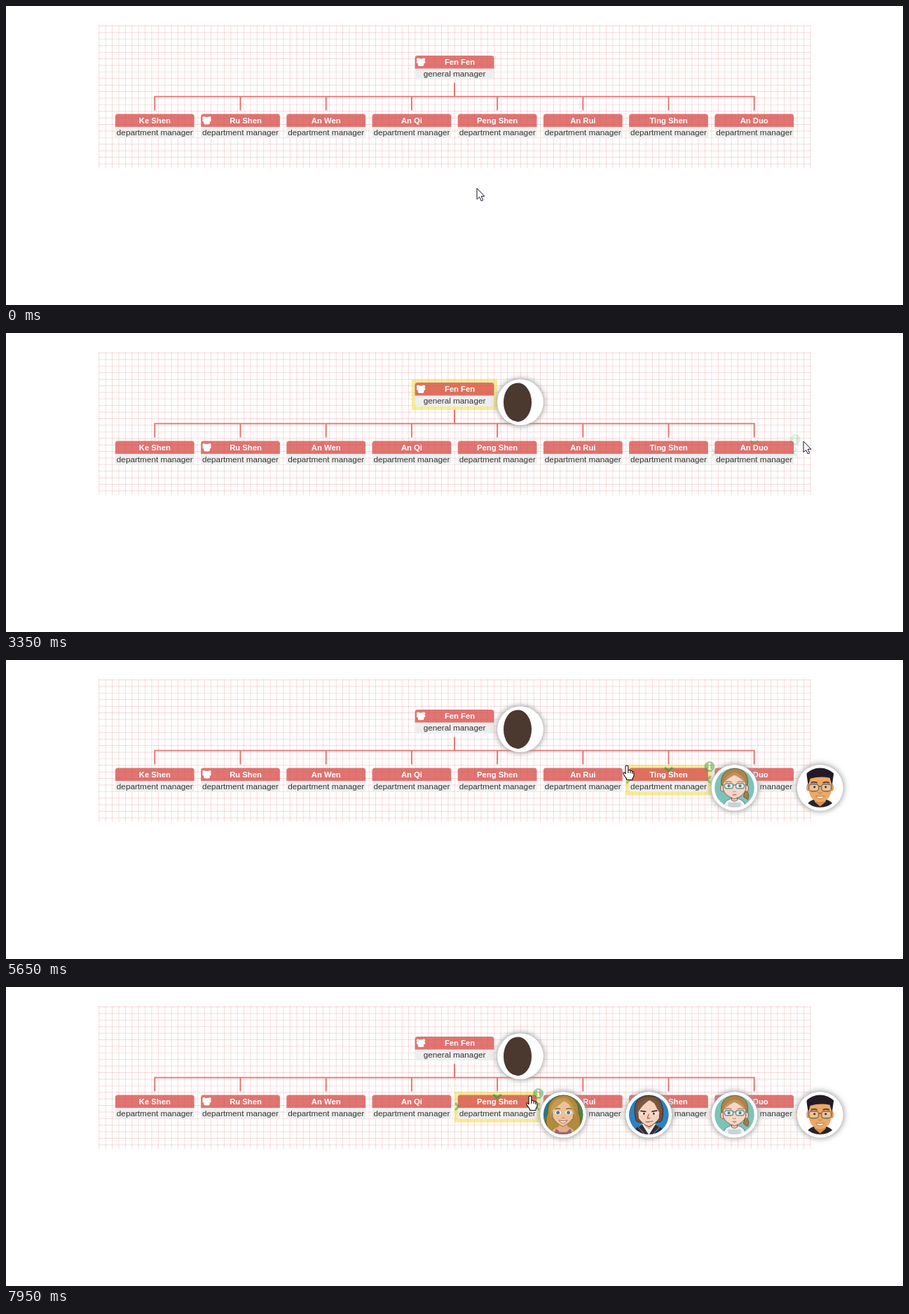
These frames come from a looping animation (1280x428 px, 8000 ms). An HTML page:

```html
<!DOCTYPE html>
<html lang="en">
<head>
<meta charset="utf-8">
<title>Organisation chart</title>
<style>
  html, body { margin: 0; width: 100%; height: 100%; overflow: hidden; background: #fff; }
  svg { display: block; width: 1280px; height: 428px; }
  text { font-family: "Liberation Sans", Arial, sans-serif; text-anchor: middle; }
  .name { font-size: 11.28px; font-weight: bold; fill: #fff; }
  .role { font-size: 11.74px; fill: #333; }
  .chevron { fill: none; stroke: #449d44; stroke-width: 3; }
  .shadow { fill: #999; filter: blur(4.2px); }
</style>
</head>
<body>
<svg id="stage" viewBox="0 0 1280 428">
  <defs>
    <clipPath id="round"><circle r="28.3"/></clipPath>

    <g id="plain"><ellipse cx="-4" rx="20" ry="28" fill="#4b382f"/></g>

    <g id="glasses-man">
      <path d="M-20 29Q-19 20-9 17H9Q19 20 20 29Z" fill="#25252a"/>
      <path d="M-8 14H8V20L0 27L-8 20Z" fill="#d88d4a"/>
      <ellipse cx="-17" cy="0" rx="2.4" ry="5" fill="#e09a55"/>
      <ellipse cx="17" cy="0" rx="2.4" ry="5" fill="#e09a55"/>
      <path d="M-16-16H16V4Q15 14 7 19Q0 22-7 19Q-15 14-16 4Z" fill="#efa763"/>
      <path d="M-17-3L-19-17Q-20-24-12-27Q0-32 12-28L20-24L17-3L14-14Q0-17-14-13Z" fill="#241a26"/>
      <path d="M-13-7Q-9-9-4-7M4-7Q9-9 13-7" fill="none" stroke="#3d2a28" stroke-width="1.6"/>
      <g fill="#f0c08c" stroke="#6d6a6a" stroke-width="1.4">
        <rect x="-16" y="-5" width="14" height="10" rx="4"/>
        <rect x="2" y="-5" width="14" height="10" rx="4"/>
        <path d="M-2-2H2"/>
      </g>
      <circle cx="-8" cy="-1" r="1.5" fill="#3c2c2a"/><circle cx="8" cy="-1" r="1.5" fill="#3c2c2a"/>
      <path d="M-3 7Q0 9 3 7" fill="none" stroke="#c47f43" stroke-width="1.2"/>
      <path d="M-6 12Q0 13 6 12Q4 16 0 16Q-4 16-6 12Z" fill="#fff" stroke="#a35c33" stroke-width=".8"/>
    </g>

    <g id="glasses-girl">
      <rect x="-29" y="-29" width="58" height="58" fill="#7cc3ba"/>
      <path d="M15 2Q23 8 19 17L13 13Z" fill="#a97b43" stroke="#6e4d2c" stroke-width=".8"/>
      <path d="M-16 29Q-16 19-6 16H6Q16 19 16 29Z" fill="#eef1f3" stroke="#6e777c"/>
      <path d="M-9 29V21H9V29" fill="#c9d2d8"/>
      <path d="M-18 1Q-22-17-11-24Q1-31 12-24Q22-17 18 1Z" fill="#b0834a" stroke="#6e4d2c" stroke-width=".8"/>
      <g fill="#f0c9b6" stroke="#6e4d42" stroke-width=".8">
        <ellipse cx="-17" cy="1" rx="3" ry="4.5"/><ellipse cx="17" cy="1" rx="3" ry="4.5"/>
        <path d="M-4 12H4V18Q0 21-4 18Z"/>
      </g>
      <path d="M-16-8Q-9-19 0-19Q10-19 16-8V3Q13 12 0 16Q-13 12-16 3Z" fill="#f6d6c5" stroke="#6e4d42" stroke-width=".8"/>
      <path d="M-17-4Q-14-18 0-22Q14-18 17-4Q11-13 0-18Q-11-13-17-4Z" fill="#c0935a"/>
      <path d="M-13-8Q-8-10-4-8M4-8Q8-10 13-8" fill="none" stroke="#80603f"/>
      <g fill="#e5efee" stroke="#5f7f7c" stroke-width="1.2">
        <rect x="-14" y="-6" width="12" height="7" rx="2.5"/>
        <rect x="2" y="-6" width="12" height="7" rx="2.5"/>
        <path d="M-2-4H2"/>
      </g>
      <circle cx="-8" cy="-2.5" r="2" fill="#4f7f7f"/><circle cx="8" cy="-2.5" r="2" fill="#4f7f7f"/>
      <path d="M-2 5Q0 7 2 5" fill="none" stroke="#b97e6b"/>
      <path d="M-3.5 10Q0 8 3.5 10Q0 12.5-3.5 10" fill="#d77d7b"/>
    </g>

    <g id="suit-man">
      <rect x="-29" y="-29" width="58" height="58" fill="#2b82c6"/>
      <path d="M-24 29Q-21 18-9 14H9Q21 18 24 29Z" fill="#2f3036"/>
      <path d="M-10 13L0 29L10 13Z" fill="#f2f2f2"/>
      <path d="M-10 13L-15 18L-5 29M10 13L15 18L5 29" fill="none" stroke="#8d9097"/>
      <path d="M-18 9Q-23-10-17-20Q-9-29 3-27Q18-26 20-9Q21 3 18 9L14 11H-14Z" fill="#74503a" stroke="#33231b" stroke-width=".9"/>
      <path d="M-6 10H6V16L0 21L-6 16Z" fill="#dcae95"/>
      <path d="M-16-9Q-9-22 1-21Q12-20 16-8L15 5Q9 14 0 17Q-9 14-15 5Z" fill="#f5d2bf" stroke="#4c352b" stroke-width=".9"/>
      <path d="M-17 0Q-18-17-5-23H5Q17-18 17 0Q12-7 8-16L1-21Q-9-14-13-7Z" fill="#7d5940"/>
      <path d="M-12-5.5L-4-4.5M4-4.5L12-6" stroke="#4c3125" stroke-width="1.8"/>
      <path d="M-11-1.5H-4M4-1.5H11" stroke="#fff" stroke-width="2.6"/>
      <circle cx="-7" cy="-1.5" r="1.5" fill="#403b3b"/><circle cx="7" cy="-1.5" r="1.5" fill="#403b3b"/>
      <path d="M0-1L-2 5H2M-5 10Q1 11 6 9" fill="none" stroke="#9a6555" stroke-width="1.2"/>
    </g>

    <g id="blonde-girl">
      <rect x="-29" y="-29" width="58" height="58" fill="#2a7686"/>
      <path d="M8-29H29V29H-29V5L-17 0Z" fill="#4e8440"/>
      <path d="M-20 24Q-28 10-22-2Q-23-17-12-24Q0-31 12-25Q23-17 22-2Q28 10 21 24L13 27H-13Z" fill="#b08a3e" stroke="#6e5427" stroke-width=".9"/>
      <path d="M-18 29Q-16 20-6 17V11H6V17Q16 20 18 29Z" fill="#dfae84"/>
      <path d="M-14 29L-10 20L-5 25H5L10 20L14 29Z" fill="#a0607a"/>
      <path d="M-16-8Q-9-20 1-20Q12-19 16-7L14 5Q9 13 0 17Q-10 13-15 4Z" fill="#ecc199" stroke="#80593c" stroke-width=".8"/>
      <path d="M-18 4Q-21-13-9-22L2-24Q16-19 18 4Q13-6 8-15L1-20Q-7-12-14-8Z" fill="#c29b4c"/>
      <path d="M-12-8Q-8-10-4-8M4-8Q8-10 12-8" fill="none" stroke="#79552f" stroke-width="1.2"/>
      <ellipse cx="-7.5" cy="-3" rx="4.2" ry="2.8" fill="#fff"/><ellipse cx="7.5" cy="-3" rx="4.2" ry="2.8" fill="#fff"/>
      <circle cx="-7.5" cy="-3" r="2.5" fill="#3b7fa8"/><circle cx="7.5" cy="-3" r="2.5" fill="#3b7fa8"/>
      <path d="M-2 4Q0 6 2 4" fill="none" stroke="#a97450"/>
      <path d="M-6 8Q0 10 6 8Q4 12 0 12Q-4 12-6 8Z" fill="#fff" stroke="#a8584f" stroke-width=".9"/>
    </g>

    <g id="team" fill="#fff">
      <circle cx="-4" cy="-3.4" r="2.2"/><circle cx="4" cy="-3.4" r="2.2"/>
      <rect x="-6.2" y="-1.8" width="12.4" height="3.8" rx="1.6"/>
      <circle cy="-1.8" r="3"/><rect x="-4.4" y="1" width="8.8" height="5" rx="2"/>
    </g>
  </defs>
  <g id="grid" fill="rgba(200,0,0,.15)"></g>
  <path id="links" fill="none" stroke="rgba(217,83,79,.8)" stroke-width="1.9"/>
  <g id="nodes"></g>
  <g id="photos"></g>
  <g id="cursor" stroke-linejoin="round">
    <path id="arrow" d="M0 0V15.6L3.6 12.3L6.2 18L8.7 16.9L6.2 11.3H10.8Z" fill="#fff" stroke="#15152e" stroke-width="1"/>
    <path id="hand" d="M-2 1.6Q-2 0 0 0Q1.8 0 1.8 1.6V6.8Q4.4 5.8 5 7.7Q7.2 6.9 7.8 8.8Q10 8.4 10 10.8V14Q9.7 17 8 18.5V20.5H-.5V18.8Q-3.6 15-5.3 11.8Q-5.5 9.3-3.3 10.2L-2 11.8ZM1.8 7V11M5 8V11M7.8 9V12" fill="#fff" stroke="#111" stroke-width="1.1"/>
  </g>
</svg>
<script>
const LOOP = 8000, TICK = 50;
const STEP = 122.2, FIRST = 212.3, ROW = 149.8, MID = 640;
const $ = id => document.getElementById(id);

// hover: pointer inside the card; focus: from one info click to the next; over: pointer on the info icon
const staff = [
  { name: "Fen Fen", role: "general manager", x: MID, y: 66.2, team: true, photo: "plain",
    hover: [[1450, 2250]], focus: [1900, 4150], over: [[1500, 2250]] },
  { name: "Ke Shen" },
  { name: "Ru Shen", team: true },
  { name: "An Wen" },
  { name: "An Qi" },
  { name: "Peng Shen", photo: "blonde-girl", hover: [[7350, LOOP]], focus: [7550, LOOP], over: [[7450, 7650]] },
  { name: "An Rui", photo: "suit-man", hover: [[5850, 7350]], focus: [6000, 7550], over: [[5900, 6100]] },
  { name: "Ting Shen", photo: "glasses-girl", hover: [[4900, 5850]], focus: [5250, 6000], over: [[5000, 5350]] },
  { name: "An Duo", photo: "glasses-man", hover: [[2950, 3150], [3650, 4900]], focus: [4150, 5250], over: [[3800, 4250]] },
];

// time, x, y of the pointer tip
const path = [
  [700, 672, 261], [1000, 735, 180], [1250, 750, 100], [1400, 714, 74], [1500, 697, 70],
  [2200, 697, 70], [2600, 910, 118], [3000, 1121, 157], [3200, 1135, 156], [3350, 1138, 155],
  [3550, 1138, 155], [3850, 1127, 153], [4150, 1127, 153], [4650, 1011, 151], [4750, 1011, 151],
  [4950, 1004, 152], [5250, 1004, 152], [5600, 886, 151], [5800, 886, 151], [5900, 881, 152],
  [6100, 881, 152], [6600, 816, 154], [6750, 816, 154], [7400, 761, 153], [7650, 759, 153], [7900, 748, 156],
];

const within = (t, spans = []) => spans.some(([a, b]) => t >= a && t < b);

function fade(t, spans) {
  return Math.max(0, ...spans.map(([a, b]) =>
    t < a ? 0 : t < b ? Math.min(1, (t - a + TICK) / 200) : 1 - (t - b) / 300));
}

function pointer(t) {
  if (t <= path[0][0]) return path[0].slice(1);
  const i = path.findIndex(p => p[0] > t);
  if (i < 0) return path[path.length - 1].slice(1);
  const [t0, x0, y0] = path[i - 1], [t1, x1, y1] = path[i];
  const k = (t - t0) / (t1 - t0), s = k * k * (3 - 2 * k);
  return [x0 + (x1 - x0) * s, y0 + (y1 - y0) * s];
}

function add(parent, markup, x, y) {
  const g = document.createElementNS("http://www.w3.org/2000/svg", "g");
  g.setAttribute("transform", `translate(${x} ${y})`);
  g.innerHTML = markup;
  return parent.appendChild(g);
}

function drawGrid() {
  const gap = 9.4, w = 0.94;
  let down = "", across = "";
  for (let x = 132.3; x < 1148.5; x += gap) down += `M${x} 27.5v204.5h${w}v-204.5z`;
  for (let y = 28.1; y < 232; y += gap) across += `M131.6 ${y}h1017v${w}h-1017z`;
  $("grid").innerHTML = `<path d="${down}"/><path d="${across}"/>`;
}

function drawLinks() {
  let d = `M${MID} 110V128.7M${FIRST - 0.95} 129.6H${FIRST + 7 * STEP + 0.95}`;
  for (let i = 0; i < 8; i++) d += `M${FIRST + i * STEP} 130.5V149.5`;
  $("links").setAttribute("d", d);
}

const rootEdges = '<path class="chevron" opacity=".5" d="M-5.8 44L0 38.7L5.8 44"/>';
const rowEdges = `<path class="chevron" opacity=".85" d="M-5.5 4.2L0 9.4L5.5 4.2"/>
  <path class="chevron" opacity=".55" d="M-60 16.5L-55.5 21.5L-60 26.5M60 16.5L55.5 21.5L60 26.5"/>`;

function drawCard(p, i) {
  const x = p.x ?? FIRST + (i - 1) * STEP, y = p.y ?? ROW;
  const g = add($("nodes"), `
    <rect class="glow" x="-61.1" width="122.2" height="44" fill="rgba(238,217,54,.5)"/>
    <path d="M-56.4 23.5v-15q0-3.8 3.8-3.8h105.2q3.8 0 3.8 3.8v15z" fill="rgba(217,83,79,.8)"/>
    <path d="M-56.4 23.5h112.8v13q0 2.5-2.5 2.5h-107.8q-2.5 0-2.5-2.5z" fill="#eee"/>
    ${p.team ? '<use href="#team" x="-48" y="13.8"/>' : ""}
    <text class="name" x="${p.team ? 7.5 : 0}" y="18">${p.name}</text>
    <text class="role" y="35">${p.role ?? "department manager"}</text>
    <g class="tools">${i ? rowEdges : rootEdges}
      <g class="info" transform="translate(58.5 2.8)">
        <circle r="7.5" fill="#449d44"/>
        <path d="M-1.3-5h2.6v2.3h-2.6zM-2.2-1.4h3.5v4.2h1v1.6h-4.6v-1.6h1v-2.6h-.9z" fill="#fff"/>
      </g>
    </g>`, x, y);
  for (const part of ["glow", "tools", "info"]) p[part] = g.querySelector("." + part);
  if (p.photo) p.face = add($("photos"), `<circle class="shadow" r="33.8"/><circle r="32.9" fill="#fff"/>
    <g clip-path="url(#round)"><use href="#${p.photo}"/></g>`, x + 94, y + 33);
}

const show = (el, on) => el.setAttribute("visibility", on ? "visible" : "hidden");

function render(t) {
  for (const p of staff) {
    const hover = p.hover ?? [];
    show(p.glow, within(t, hover) || (p.focus && within(t, [p.focus])));
    p.tools.setAttribute("opacity", fade(t, hover));
    p.info.setAttribute("opacity", within(t, p.over) ? 1 : 0.5);
    if (p.face) show(p.face, t >= p.focus[0]);
  }
  const [x, y] = pointer(t);
  $("cursor").setAttribute("transform", `translate(${x} ${y})`);
  const hand = t >= 4200 && !staff.some(p => within(t, p.over));
  show($("hand"), hand);
  show($("arrow"), !hand);
}

drawGrid();
drawLinks();
staff.forEach(drawCard);

const start = performance.now();
function frame() {
  const t = (performance.now() - start) % LOOP;
  render(Math.floor(t / TICK) * TICK);
  requestAnimationFrame(frame);
}
frame();
</script>
</body>
</html>
```
